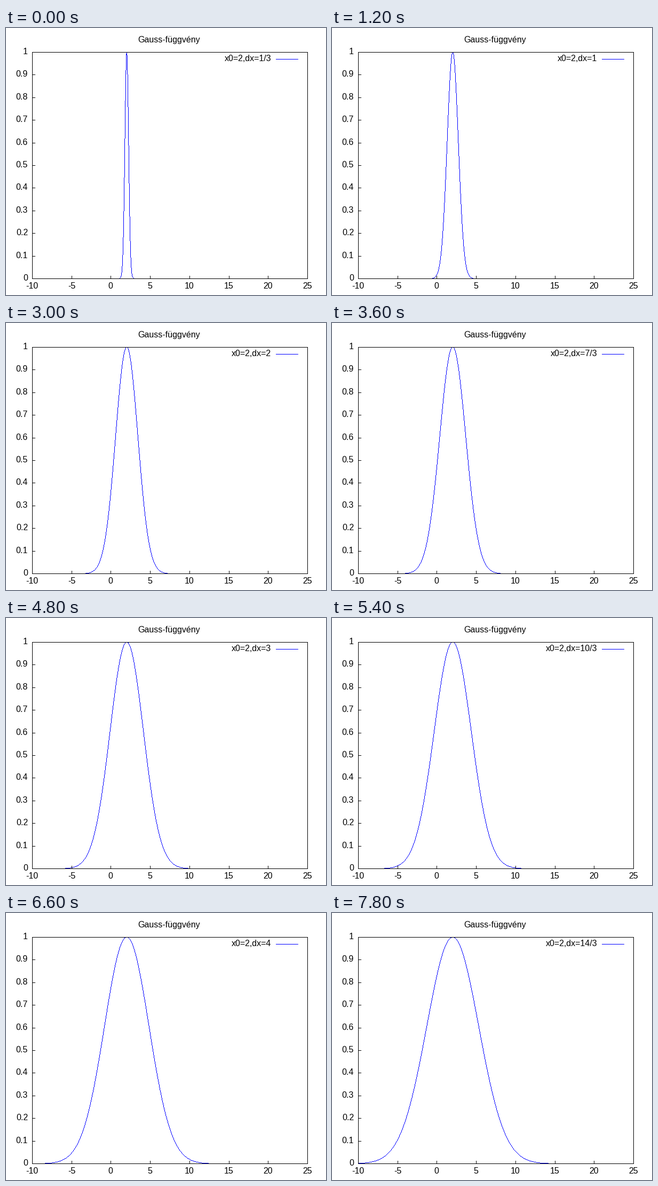
A matplotlib script for the animation above (8000 ms loop, 600 px wide and 500 px high).

```python
from math import gcd

import matplotlib.pyplot as plt
import numpy as np
from matplotlib.animation import FuncAnimation
from matplotlib.collections import LineCollection

WIDTH, HEIGHT, DPI = 600, 500, 100
LEFT, RIGHT, TOP, BOTTOM = 49, 565, 45, 469
X_MIN, X_MAX = -10, 25
CENTER = 2
TICK = 5
DROP = 4  # text baseline below the height it belongs to
INTERVAL = 200
FRAMES = 40
FRAMES_PER_STEP = 3
PX = 72 / DPI

plt.rcParams["font.family"] = "Liberation Sans"
plt.rcParams["path.simplify"] = False

fig = plt.figure(figsize=(WIDTH / DPI, HEIGHT / DPI), dpi=DPI, facecolor="white")
ax = fig.add_axes([0, 0, 1, 1])
ax.set_xlim(0, WIDTH)
ax.set_ylim(HEIGHT, 0)
ax.axis("off")


def nearest(v):
    return np.floor(v + 0.5)


def x_px(x):
    return LEFT + (x - X_MIN) / (X_MAX - X_MIN) * (RIGHT - LEFT)


def y_px(y):
    return BOTTOM - y * (BOTTOM - TOP)


def line(xs, ys, color="black"):
    """Draw a crisp one-pixel line through pixel centres."""
    ax.plot(np.asarray(xs) + 0.5, np.asarray(ys) + 0.5, color=color, lw=PX,
            antialiased=False, snap=False, zorder=3,
            solid_capstyle="projecting")


def label(x, y, text, ha):
    return ax.text(x, y, text, ha=ha, va="baseline", fontsize=16 * PX, color="black")


def draw_axes():
    line([LEFT, RIGHT, RIGHT, LEFT, LEFT], [TOP, TOP, BOTTOM, BOTTOM, TOP])
    for value in range(X_MIN, X_MAX + 1, 5):
        x = nearest(x_px(value))
        line([x, x], [BOTTOM, BOTTOM - TICK])
        label(x, 488, str(value), "center")
    for tenth in range(11):
        y = nearest(y_px(tenth / 10))
        line([LEFT, LEFT + TICK], [y, y])
        label(41, y + DROP, f"{tenth / 10:g}", "right")


def curve_runs(dx):
    """One vertical run of pixels per column, so the line stays one pixel thin."""
    cols = np.arange(LEFT, RIGHT + 1)
    edges = cols + np.array([[-0.5], [0], [0.5]])
    x = X_MIN + (edges - LEFT) / (RIGHT - LEFT) * (X_MAX - X_MIN)
    rows = nearest(y_px(np.exp(-((x - CENTER) / dx) ** 2)))
    top = rows.min(axis=0)
    bottom = np.maximum(rows.max(axis=0), top + 1)
    return [[(c + 0.5, a), (c + 0.5, b)] for c, a, b in zip(cols, top, bottom)]


def width_text(thirds):
    return str(thirds // 3) if gcd(thirds, 3) == 3 else f"{thirds}/3"


draw_axes()
label(306, 27, "Gauss-függvény", "center")
key = label(497, 58 + DROP, "", "right")
line([506, 547], [58, 58], "blue")

curve = LineCollection([], colors="blue", linewidths=PX, antialiaseds=False,
                       capstyle="butt", zorder=2)
curve.set_snap(False)
ax.add_collection(curve, autolim=False)


def update(i):
    thirds = i // FRAMES_PER_STEP + 1
    curve.set_segments(curve_runs(thirds / 3))
    key.set_text(f"x0={CENTER},dx={width_text(thirds)}")
    return curve, key


anim = FuncAnimation(fig, update, frames=FRAMES, interval=INTERVAL,
                     repeat=True, repeat_delay=0)
plt.show()
```
